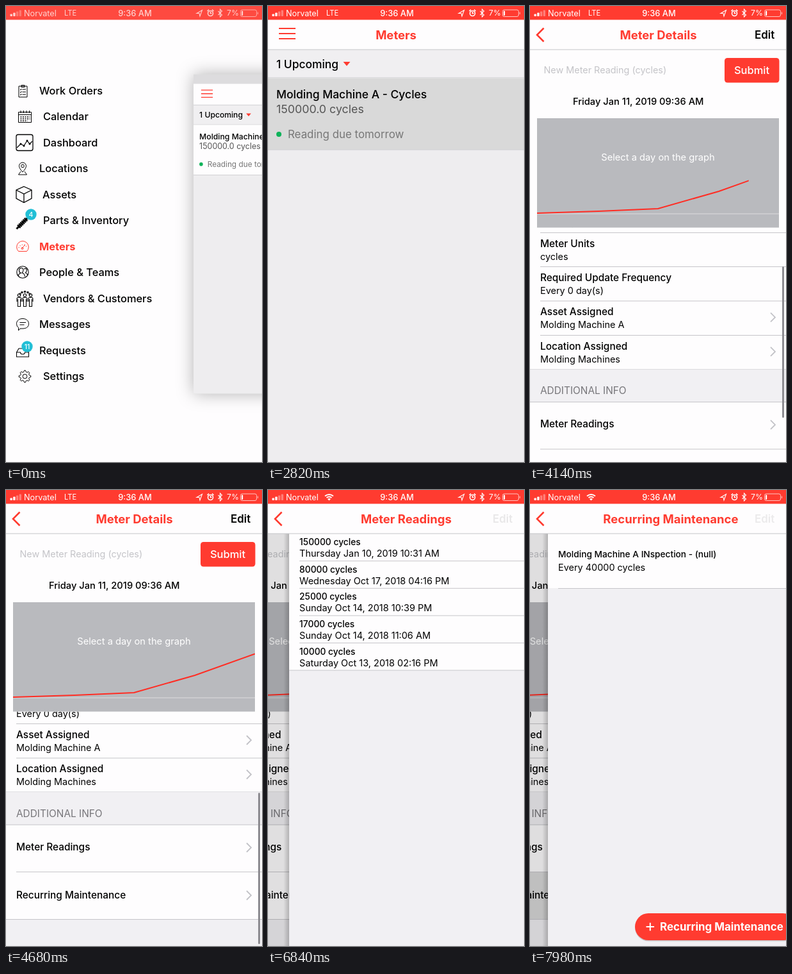
These frames come from a looping animation (400 px wide and 711 px high, 8 s). An HTML page:

```html
<!DOCTYPE html>
<html lang="en">
<head>
<meta charset="utf-8">
<title>Meters</title>
<style>
  html, body { margin: 0; width: 100%; height: 100%; overflow: hidden; background: #fefdfe; }
  svg { display: block; width: 400px; height: 711px; overflow: hidden; }
  text { font-family: Inter, "Open Sans", sans-serif; white-space: pre; }
  #shadow { filter: drop-shadow(0 0 19px rgba(0, 0, 0, .3)); }
</style>
</head>
<body>
<svg id="stage" viewBox="0 0 400 711"></svg>
<script>
const RED = '#ff3b30', GREY = '#f1f0f3', WHITE = '#fefdfe', LINE = '#c6c5c9', W = 400, H = 711;

// ---- drawing helpers; text is placed by the middle of its capitals
const text = (x, y, s, size, weight = 400, fill = '#000', more = '') =>
  `<text x="${x}" y="${(y + size * .36).toFixed(2)}" font-size="${size}" font-weight="${weight}" fill="${fill}" ${more}>${s.replace('&', '&amp;')}</text>`;
const mid = 'text-anchor="middle"';
const rect = (x, y, w, h, fill, more = '') => `<rect x="${x}" y="${y}" width="${w}" height="${h}" fill="${fill}" ${more}/>`;
const rule = (y, x = 0) => rect(x, y - .5, W - x, 1, LINE);
const path = (d, color = '#000', width = 1, more = '') =>
  `<path d="${d}" fill="none" stroke="${color}" stroke-width="${width}" ${more}/>`;
const dot = (x, y, r, fill) => `<circle cx="${x}" cy="${y}" r="${r}" fill="${fill}"/>`;
const ring = (x, y, r) => `M${x - r} ${y}a${r} ${r} 0 1 1 ${2 * r} 0a${r} ${r} 0 1 1 ${-2 * r} 0`;
const group = (id, body, more = '') => `<g id="${id}" ${more}>${body}</g>`;
const chevron = y => path(`M376 ${y - 7}l7 7l-7 7`, '#c2c2c7', 1.8);
const badge = (x, y, s) => dot(x, y, 8.7, '#22bfd6') + text(x, y, s, 10.5, 500, '#fff', mid);

// ---- side menu
function gear(x, y) {
  let d = '';
  for (let i = 0; i < 32; i++) {
    const r = i % 4 < 2 ? 9.3 : 7, a = (i - .5) * Math.PI / 16;
    d += `${i ? 'L' : 'M'}${(x + r * Math.cos(a)).toFixed(1)} ${(y + r * Math.sin(a)).toFixed(1)}`;
  }
  return d + 'Z' + ring(x, y, 3.4);
}
const person = x => ring(x, 451, 2.2) +
  `M${x - 3.5} 461v-4q0-2.500 2-2.500h3q2 0 2 2.500v4M${x - 2} 457v11.500h4v-11.500`;
const icons = [
  path('M20 125h13v17h-13zM24 126.500v-3h5v3zM25.500 130h5.500M25.500 134h5.500M25.500 138h5.500M22 130l1 1l1.500-2M22 134l1 1l1.500-2M22 138l1 1l1.500-2'),
  path('M19.500 165.500h20v16h-20zM19.500 169.500h20M23 163v4M27.500 163v4M32 163v4M36.500 163v4') +
    path('M22.500 173h15M22.500 176h15M22.500 179h11', '#000', 1.5, 'stroke-dasharray="2 1.500"'),
  path('M19 200.500h20q3 0 3 3v19q0 3-3 3h-20q-3 0-3-3v-19q0-3 3-3z', '#000', 1.3) +
    path('M17 221l6-6l5 3l5-8l4 5l4-4', '#000', 1.2) + [[23, 215], [28, 218], [33, 210], [37, 215]].map(p => dot(...p, 1.5, '#000')).join(''),
  path('M26 259q-5.500-6-5.500-9.500a5.500 5.500 0 0 1 11 0q0 3.500-5.500 9.500zM23 258l-3.500 5h13l-3.500-5' + ring(26, 249.500, 2.3)),
  path('M28 281.500l12 5.500v13l-12 6.500l-12-6.500v-13zM16 287l12 6l12-6M28 293v13', '#000', 1.3),
  path('M19.500 344.500l13-13', '#000', 6.5, 'stroke-dasharray="2.300 .700"') + path('M16.500 347.500l17-17', '#000', 3) +
    badge(39, 325, '4'),
  path('M19.500 382.500a9.300 9.300 0 1 1 13 0zM25 378l5-6' + ring(25.500, 378, 1.5), RED) +
    path('M20 377a6.500 6.500 0 0 1 12.500 0', RED, 1.2, 'stroke-dasharray="1 2.400"'),
  path(ring(26, 415, 9.2) + 'M19 421q1-4 4-4.500q-3-2-2.500-5q.5-3 3.500-3q3 0 3 3.500q0 2.500-2 4q4 1 4.500 6M28 410q4-2 4.500 2q0 2-2 4q2.500 1 3 3', '#000', 1.1),
  path(person(20.500) + person(29.500) + person(38.500), '#000', 1.1) +
    [[25, 446.500], [34, 446.500], [29.500, 445.500], [22, 449], [37, 449]].map(p => dot(...p, 1.8, '#222')).join(''),
  path('M22 503l-2.500 3v-4.500q-3-2-3-6c0-5 4-8 9.500-8s9.500 3 9.500 8s-4 7.500-9.500 7.500zM21.500 493.500h9.500M21.500 497h7'),
  path('M16.500 540l3.500-6h12l3.500 6v7h-19zM16.500 540h6q0 3 3.500 3t3.500-3h6', '#000', 1.1) + badge(33, 531, '11'),
  path(gear(29.500, 577.500))
];
const items = ['Work Orders', 'Calendar', 'Dashboard', 'Locations', 'Assets', 'Parts & Inventory', 'Meters',
  'People & Teams', 'Vendors & Customers', 'Messages', 'Requests', 'Settings'];
const indent = [52, 58, 58, 52, 57, 58, 52, 52, 58, 52, 52, 58];
const menu = items.map((s, i) => icons[i] +
  text(indent[i], 132 + 40.5 * i, s, 16.4, i == 6 ? 700 : 500, i == 6 ? RED : '#000')).join('');

// ---- pages
const page = (id, bg, body) => group(id,
  rect(-9, 68, 9, H - 68, 'url(#edge)', 'class="edge"') + rect(0, 68, W, H - 68, bg) + body +
  rect(0, 68, W, H - 68, '#000', 'class="dim" opacity="0"'));

const list = page('list', '#eeedef',
  rect(0, 68, W, 44, '#f0eff1') + rule(112) +
  text(13, 90.5, '1 Upcoming', 17.4, 500) + `<path d="M117.500 87h11l-5.500 6.500z" fill="${RED}"/>` +
  rect(0, 112.5, W, 111, WHITE) + rect(0, 112.5, W, 111, '#d9d9d9', 'id="listTap" opacity="0"') + rule(224) +
  text(13, 138, 'Molding Machine A - Cycles', 17.5, 500) +
  text(13, 160.5, '150000.0 cycles', 17.8, 400, '#555') +
  dot(17, 200, 4, '#0fb35a') + text(31, 200, 'Reading due tomorrow', 16.9, 400, '#777'));

const field = (y, name, value) => text(16, y, name, 15.4, 500) + text(16, y + 20.5, value, 14.45);
const heading = (y, h, ty, s) => rect(0, y, W, h, GREY) + text(16, ty, s, 15.4, 400, '#77767a') + rule(y + h);
const table =
  rect(0, 346, W, 502, WHITE) + rect(0, 848, W, 300, GREY) +
  heading(346, 37, 365, 'METER INFO') +
  field(399, 'Meter Name', 'Molding Machine A - Cycles') +
  field(452.5, 'Meter Units', 'cycles') +
  field(506, 'Required Update Frequency', 'Every 0 day(s)') +
  field(559, 'Asset Assigned', 'Molding Machine A') + chevron(568) +
  field(612.5, 'Location Assigned', 'Molding Machines') + chevron(621.5) +
  [436, 489, 542.5, 596].map(y => rule(y, 16)).join('') + rule(649) +
  heading(649, 51, 682, 'ADDITIONAL INFO') +
  rect(0, 700.5, W, 73, '#d9d9d9', 'id="readTap" opacity="0"') +
  rect(0, 774, W, 74, '#d9d9d9', 'id="recurTap" opacity="0"') +
  text(16, 734, 'Meter Readings', 15.4, 500) + chevron(735.5) + rule(773.5, 16) +
  text(16, 809, 'Recurring Maintenance', 15.4, 500) + chevron(810) + rule(847.5);

const details = page('details', WHITE,
  `<g clip-path="url(#below)">${group('table', table)}</g>` +
  text(21.5, 100, 'New Meter Reading (cycles)', 14.4, 400, '#c4c4c8') +
  rect(304, 81, 85.5, 38.5, RED, 'rx="4.500"') + text(346.5, 100, 'Submit', 16.5, 500, '#fff', mid) +
  text(67, 148.5, 'Friday Jan 11, 2019 09:36 AM', 14.7, 500) +
  rect(11, 175, 378, 170.5, '#b9babe') + rect(11, 323.5, 378, 1, '#dddde0') +
  text(200, 236, 'Select a day on the graph', 14.7, 400, '#fff', mid) +
  `<g clip-path="url(#drawn)">${path('M11 323L107 320L200 316L295 289L389 255.500', '#ff2d24', 2)}</g>` +
  rect(394, 0, 3, 236, '#8c8b90', 'id="bar" rx="1.500"'));

const log = [['150000', 'Thursday Jan 10, 2019 10:31 AM'], ['80000', 'Wednesday Oct 17, 2018 04:16 PM'],
  ['25000', 'Sunday Oct 14, 2018 10:39 PM'], ['17000', 'Sunday Oct 14, 2018 11:06 AM'], ['10000', 'Saturday Oct 13, 2018 02:16 PM']];
const readings = page('readings', GREY, rect(0, 68, W, 213.5, WHITE) + log.map(([n, when], i) => {
  const y = 42.6 * i;
  return text(16, 81.3 + y, n + ' cycles', 13.8, 500) + text(16, 99 + y, when, 14.5) + rule(110.7 + y, i < 4 ? 16 : 0);
}).join(''));

const recurring = page('recurring', GREY, rect(0, 68, W, 85, WHITE) + rule(153.5, 16) +
  text(16, 100, 'Molding Machine A INspection - (null)', 13.7, 500) + text(16, 120.5, 'Every 40000 cycles', 14.45) +
  rect(136, 661.5, 252, 42, '#000', 'rx="21" opacity=".18"') + rect(136, 660, 252, 42, RED, 'rx="21"') +
  path('M153.500 681h12.500M159.750 674.750v12.500', '#fff', 2) +
  text(175, 681, 'Recurring Maintenance', 16.9, 700, '#fff'));

// ---- bars
const title = (id, s) => group(id, text(0, 45, s, 18.5, 700, RED, mid));
const nav = rect(0, 21, W, 47, WHITE) + rule(68) +
  group('burger', path('M17 35h26M17 43h26M17 51h26', RED, 1.8)) +
  group('back', path('M21.500 34.500l-10.500 10.500l10.500 10.500', RED, 2.6)) +
  title('t0', 'Meters') + title('t1', 'Meter Details') + title('t2', 'Meter Readings') + title('t3', 'Recurring Maintenance') +
  group('edit', text(351, 45, 'Edit', 16.9, 600));

const status = rect(0, 0, W, 21.5, RED) + group('info',
  [0, 1, 2, 3].map(i => rect(6.5 + 4.7 * i, 12.5 - 2 * i, 3.4, 3.5 + 2 * i, '#fff', `rx=".800" opacity="${i < 2 ? 1 : .35}"`)).join('') +
  text(28, 11, 'Norvatel', 12.7, 400, '#fff') +
  group('lte', text(91, 11, 'LTE', 11.2, 400, '#fff')) +
  group('wifi', path('M89 9.500q6.500-5 13 0M91.500 12q4-3 8 0', '#fff', 2) + `<path d="M93 14q2.500-2 5 0l-2.500 2.500z" fill="#fff"/>`) +
  text(201.5, 11, '9:36 AM', 12.9, 500, '#fff', mid) +
  path('M298 11.500l8.500-5l-3.500 9.500l-1-4.500z', '#fff', 1.1) +
  path(ring(319.500, 11.500, 4) + 'M319.500 9v2.500h2', '#fff', 1.6) + path('M314.500 8l2.500-2.300M324.500 8l-2.500-2.300', '#fff', 1.6) +
  path('M331.500 8l6 6l-3 3v-12l3 3l-6 6', '#fff', 1.1) +
  text(345, 11, '7%', 12.2, 400, '#fff') +
  path('M369 6h20q2.500 0 2.500 2.500v5.500q0 2.500-2.500 2.500h-20q-2.500 0-2.500-2.500v-5.500q0-2.500 2.500-2.500zM393.500 9.500v3.500', '#ffc4c0', 1) +
  rect(368, 7.5, 2.2, 7.5, '#fff', 'rx="1"'));

document.getElementById('stage').innerHTML =
  `<defs><linearGradient id="edge"><stop stop-opacity="0"/><stop offset="1" stop-opacity=".2"/></linearGradient>
   <clipPath id="below">${rect(0, 345.5, W, H, '#000')}</clipPath>
   <clipPath id="drawn">${rect(11, 175, 378, 171, '#000', 'id="reveal"')}</clipPath></defs>` +
  rect(0, 0, W, H, WHITE) + group('menu', menu) +
  group('panel', rect(0, 0, W, H, '#dddcde', 'id="shadow"') + rect(0, 0, W, 22, WHITE, 'id="cap"') +
    list + details + readings + recurring + group('nav', nav)) + group('status', status);

// ---- motion
const $ = id => document.getElementById(id);
const clamp = v => Math.max(0, Math.min(1, v));
const ramp = (t, a, b) => clamp((t - a) / (b - a));
const fade = (id, v) => $(id).setAttribute('opacity', v);
const move = (id, v) => $(id).setAttribute('transform', v);
const spring = (t, start) => {
  const a = Math.max(0, t - start) * .019;
  return a > 10 ? 1 : 1 - (1 + a) * Math.exp(-a);
};

// shown: how far a page has come in; covered: how far the next one is over it
function place(id, shown, covered) {
  const el = $(id);
  el.style.display = shown > 0 && covered < 1 ? '' : 'none';
  move(id, `translate(${W * (1 - shown) - 120 * covered} 0)`);
  el.querySelector('.dim').setAttribute('opacity', .13 * covered);
  el.querySelector('.edge').setAttribute('opacity', shown < 1 ? 1 : 0);
}
function placeTitle(id, center, shown, covered) {
  const dx = W * (1 - shown);
  move(id, `translate(${center + Math.min(160, .0145 * dx * dx) - 150 * covered} 0)`);
  fade(id, clamp((shown - .3) * 2) * clamp(1 - 2.5 * covered));
}

function draw(t) {
  t = Math.floor(t / 60) * 60;
  if (t > 2880 && t < 3060) t = 2880; // short stall

  // closing the side menu
  const m = ramp(t, 1961.5, 2160), open = m * m * (3 - 2 * m), s = .7 + .3 * open, k = 1 + .5 * open;
  move('panel', `translate(${293 * (1 - open)} ${355.5 * (1 - s)}) scale(${s})`);
  move('menu', `translate(${200 * (1 - k)} ${355.5 * (1 - k)}) scale(${k})`);
  fade('menu', 1 - open);
  fade('cap', t < 60 ? 0 : 1);
  fade('status', .92 + .08 * ramp(t, 0, 180));
  fade('info', .75 + .25 * ramp(t, 0, 180));
  fade('lte', t < 5040 ? 1 : 0);
  fade('wifi', t < 5040 ? 0 : 1);

  // page stack
  const pop = spring(t, 6815);
  const p1 = spring(t, 2883), p2 = spring(t, 5000) * (1 - pop), p3 = spring(t, 7752), over = Math.max(p2, p3);
  place('list', 1, p1);
  place('details', p1, over);
  place('readings', p2, 0);
  place('recurring', p3, 0);
  placeTitle('t0', 200, 1, p1);
  placeTitle('t1', 200.5, p1, over);
  placeTitle('t2', 200, p2, 0);
  placeTitle('t3', 208.5, p3, 0);
  fade('burger', clamp(1 - 2 * p1));
  fade('back', clamp(2 * p1 - .6));
  fade('edit', clamp(2 * p1 - .6) * (1 - over));

  // pressed rows
  fade('listTap', t >= 2820 ? 1 : 0);
  fade('readTap', t >= 4860 && t < 5460 ? 1 : 0);
  fade('recurTap', t >= 7680 ? 1 : 0);

  // graph and table
  $('reveal').setAttribute('width', 378 * ramp(t, 3300, 4260));
  const scroll = 178 * (1 - (1 - ramp(t, 4020, 4660)) ** 3);
  move('table', `translate(0 ${-scroll})`);
  $('bar').setAttribute('y', 349 + scroll * 123 / 178);
  fade('bar', ramp(t, 3960, 4080) * (1 - ramp(t, 4740, 4980)));
}

function frame() {
  draw(performance.now() % 8000);
  requestAnimationFrame(frame);
}
frame();
</script>
</body>
</html>
```
